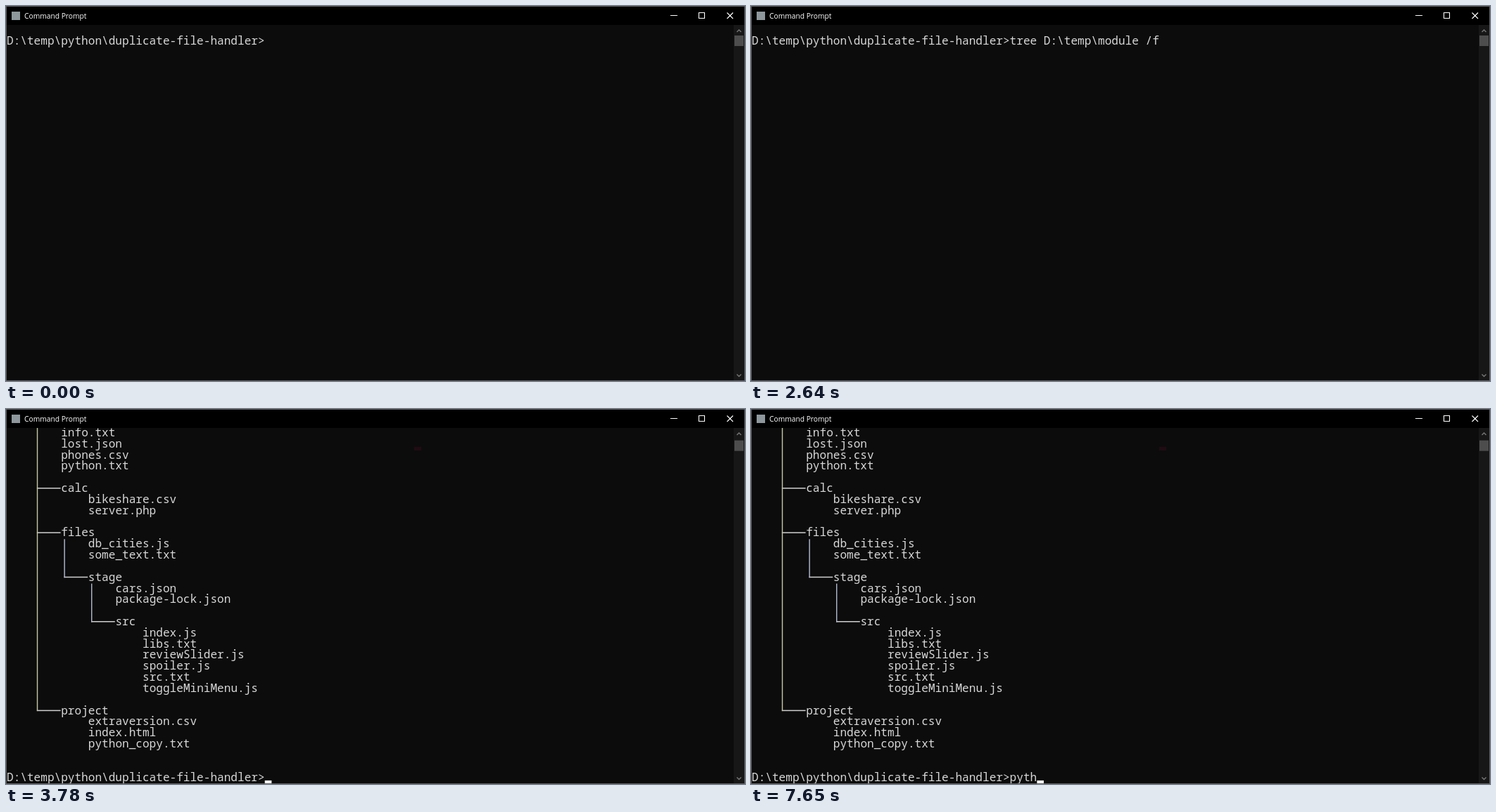
An HTML page for the animation above (8 s loop, 1050 by 534 pixels).

```html
<!DOCTYPE html>
<html lang="en">
<head>
<meta charset="utf-8">
<title>Command Prompt</title>
<style>
  html, body { margin: 0; width: 100%; height: 100%; overflow: hidden; background: #0c0c0c; }
  svg { display: block; }
  text { white-space: pre; }
  .mono { font: 500 16.08px "Noto Sans Mono", monospace; fill: #d8d8d8; }
  .title { font: 10.25px "Open Sans", "Noto Sans", sans-serif; fill: #fff; }
  .icon { fill: none; stroke: #fff; stroke-width: 1.1; }
  .arrow { fill: none; stroke: #777; stroke-width: 1.4; }
</style>
</head>
<body>
<svg width="1050" height="534" viewBox="0 0 1050 534">
  <defs><clipPath id="view"><rect id="window" x="1" y="27" width="1032" height="506"/></clipPath></defs>
  <rect width="1050" height="534" fill="#0c0c0c"/>
  <rect id="ghost" x="580" y="54" width="10" height="5" fill="#210b12"/>
  <g clip-path="url(#view)"><g id="screen"></g></g>
  <rect width="1050" height="27"/>
  <rect x="8" y="8" width="12" height="12" fill="#8d979c"/>
  <text id="title" class="title" x="26" y="17.7"></text>
  <path class="icon" d="M944 13.5h10M984.5 9.5h8v8h-8zM1024.5 9.5l8.500 8.500M1033 9.5l-8.500 8.500"/>
  <rect x="1034" y="27" width="15" height="506" fill="#171717"/>
  <rect id="thumb" x="1035" y="42" width="13" height="15" fill="#4d4d4d"/>
  <path class="arrow" d="M1038.5 37l3-3 3 3M1038.5 524.5l3 3 3-3"/>
  <rect x=".5" y=".5" width="1049" height="533" fill="none" stroke="#5c5c5c"/>
</svg>
<script>
const LOOP = 8000, BLINK = 530, FLASH = 70;
const ENTER = 450, LIST = 3710, DONE = 3780, RESUME = 6660;
const KEYS = [5700, 5990, 6190, 6390];
const COL = 9.65, ROW = 15.83, SCROLL = 6, PAUSE_ROW = 27;
const PROMPT = 'D:\\temp\\python\\duplicate-file-handler>';
const TREE = 'tree D:\\temp\\module /f';
const NEXT = 'pyth';

const $ = id => document.getElementById(id);
const colX = c => 1 + c * COL;
const rowY = r => 27 + r * ROW;
const show = (el, on) => { el.style.display = on ? '' : 'none'; };

function add(parent, tag, attrs, content = '') {
  const el = document.createElementNS('http://www.w3.org/2000/svg', tag);
  for (const key in attrs) el.setAttribute(key, attrs[key]);
  el.textContent = content;
  parent.append(el);
  return el;
}
const bar = (parent, x, y, width, height, fill) =>
  add(parent, 'rect', { x, y, width, height, fill });
const write = (parent, row, col, str) =>
  add(parent, 'text', { class: 'mono', x: colX(col), y: rowY(row) + 11.9 }, str);

const screen = $('screen');
const head = write(screen, 1, 0, '');
const listing = add(screen, 'g', {});
const rest = add(screen, 'g', {});
const print = (row, col, str) => write(row < PAUSE_ROW ? listing : rest, row, col, str);

const dir = (name, files, ...dirs) => ({ name, files: files.split(' ').filter(Boolean), dirs });
const tree = dir('D:\\TEMP\\MODULE', '',
  dir('root_folder', 'info.txt lost.json phones.csv python.txt',
    dir('calc', 'bikeshare.csv server.php'),
    dir('files', 'db_cities.js some_text.txt',
      dir('stage', 'cars.json package-lock.json',
        dir('src', 'index.js libs.txt reviewSlider.js spoiler.js src.txt toggleMiniMenu.js'))),
    dir('project', 'extraversion.csv index.html python_copy.txt')));

// Prints a folder with its branches and returns the next free row
function printDir({ name, files, dirs }, row, col) {
  const x = colX(col + .5) - .6;
  const top = row + 1;
  print(row++, col, name);
  for (const file of files) print(row++, col + 4, file);
  if (files.length) row++;
  let last;
  for (const sub of dirs) {
    last = row;
    bar(listing, x, rowY(row) + 5.9, 3.5 * COL, 1.5, '#d0d0d0');
    row = printDir(sub, row, col + 4);
  }
  if (last) bar(listing, x, rowY(top), 1.4, rowY(last) + 7.4 - rowY(top), col > 4 ? '#b4bcd4' : '#c8c8ac');
  return row;
}

print(2, 0, 'Folder PATH listing for volume Data');
print(3, 0, 'Volume serial number is 000000F3 0A63:0965');
const lastRow = printDir(tree, 4, 0) + 1;
const foot = write(rest, lastRow, 0, '');
const cursor = bar(screen, 0, 0, 9.7, 4.6, '#f2f2f2');

// Each entry flashes the cursor; listing holds it on for one blink
function cursorOn(t) {
  const key = [ENTER, ...KEYS].filter(k => k <= t).pop();
  if (t - key < FLASH) return true;
  if (t >= LIST && t < LIST + BLINK) return true;
  if (t < KEYS[0]) return t > ENTER && Math.floor((t - ENTER - FLASH) / BLINK) % 2 === 1;
  return t >= RESUME && Math.floor((t - RESUME + FLASH) / BLINK) % 2 === 0;
}

function render(t) {
  const entered = t >= ENTER, listed = t >= LIST, done = t >= DONE;
  const typed = KEYS.filter(k => k <= t).length;
  const paused = listed && !done;

  head.textContent = PROMPT + (entered ? TREE : '');
  foot.textContent = PROMPT + NEXT.slice(0, typed);
  $('title').textContent = 'Command Prompt' + (paused ? ' - tree  D:\\temp\\module /f' : '');
  show(listing, listed);
  show(rest, done);
  show($('ghost'), listed);
  show(cursor, cursorOn(t));
  screen.setAttribute('transform', `translate(0 ${done ? -SCROLL * ROW : 0})`);
  $('window').setAttribute('height', paused ? (PAUSE_ROW + 1) * ROW : 506);
  $('thumb').setAttribute('y', done ? 44.7 : 42);

  const [row, col] = done ? [lastRow, PROMPT.length + typed]
    : paused ? [PAUSE_ROW, 20]
    : [1, PROMPT.length + TREE.length];
  cursor.setAttribute('x', colX(col));
  cursor.setAttribute('y', rowY(row) + 11.2);
}

function tick() {
  render(performance.now() % LOOP);
  requestAnimationFrame(tick);
}
tick();
</script>
</body>
</html>
```
